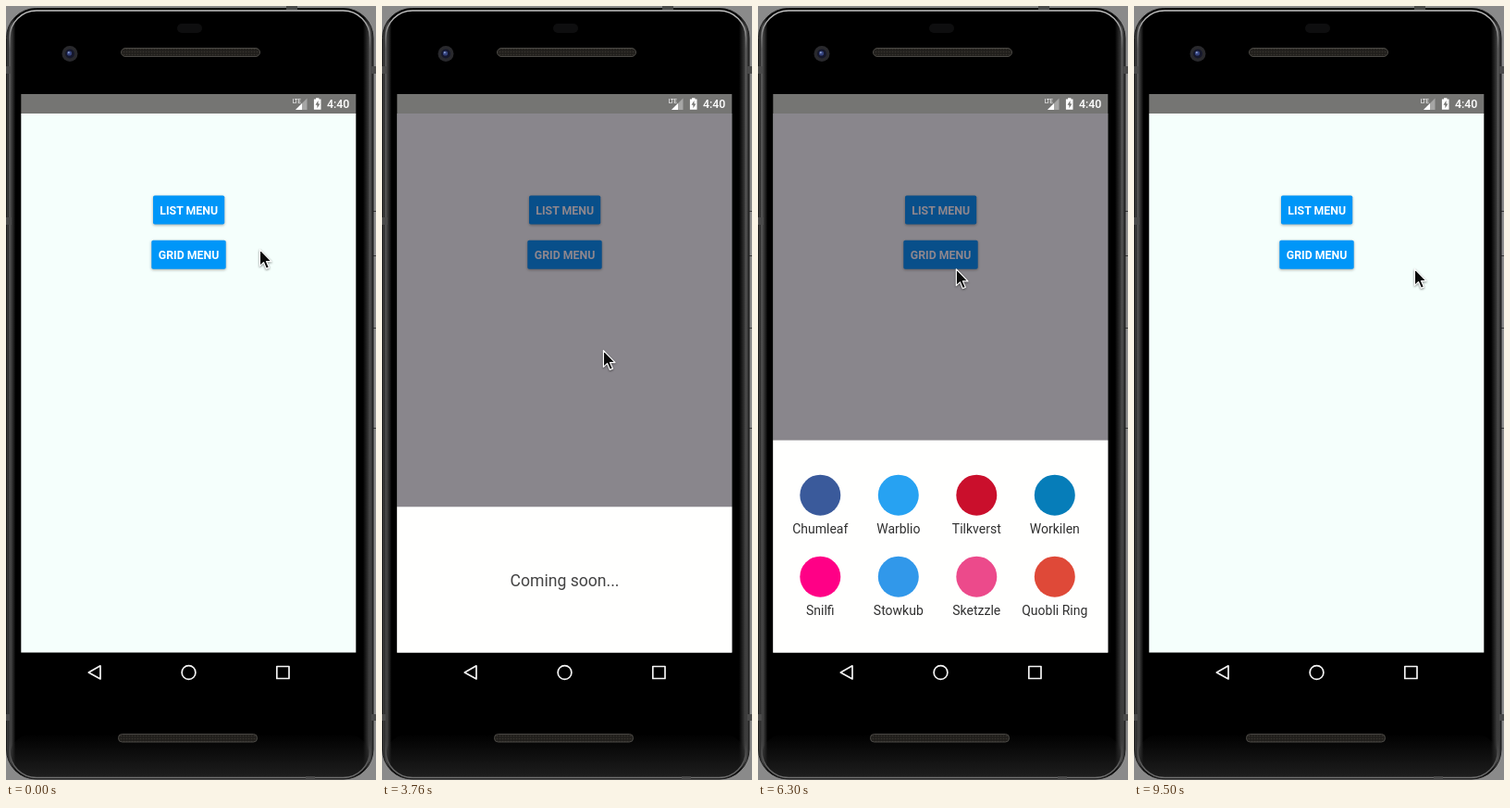
These frames come from a looping animation (400 by 835 pixels, 9.53 s). An HTML page:

```html
<!DOCTYPE html>
<html lang="en">
<head>
<meta charset="utf-8">
<title>Bottom sheet menu</title>
<style>
  html, body { margin: 0; width: 100%; height: 100%; overflow: hidden; background: #8a8a8a; }
  svg { display: block; width: 100%; height: 100%; }
  text { font-family: Roboto, sans-serif; }
  .btn rect { fill: #0096f8; filter: drop-shadow(0 1.6px 1.4px rgba(0, 0, 0, .34)); }
  .btn text { font-size: 12.33px; font-weight: 700; fill: #fff; text-anchor: middle; }
  .label { font-size: 14px; fill: #303030; text-anchor: middle; }
  #soon { font-size: 17.6px; fill: #444; text-anchor: middle; }
  #cursor { filter: drop-shadow(.5px 1.5px 1.2px rgba(0, 0, 0, .45)); }
</style>
</head>
<body>
<svg viewBox="0 0 400 835">
  <defs>
    <linearGradient id="side" gradientUnits="userSpaceOnUse" x1="0" x2="400">
      <stop offset="0" stop-color="#6a6a6a"/>
      <stop offset=".005" stop-color="#2a2a2a"/>
      <stop offset=".012" stop-color="#4a4a4a"/>
      <stop offset=".018" stop-color="#2c2c2c"/>
      <stop offset=".026" stop-color="#000"/>
      <stop offset=".965" stop-color="#000"/>
      <stop offset=".977" stop-color="#2c2c2c"/>
      <stop offset=".984" stop-color="#4a4a4a"/>
      <stop offset=".992" stop-color="#2a2a2a"/>
    </linearGradient>
    <linearGradient id="base" x2="0" y2="1">
      <stop offset="0" stop-color="#1e1e1e" stop-opacity="0"/>
      <stop offset="1" stop-color="#1e1e1e"/>
    </linearGradient>
    <linearGradient id="edge" x2="0" y2="1">
      <stop offset="0" stop-color="#c4c4c4"/>
      <stop offset=".05" stop-color="#5c5c5c"/>
      <stop offset=".95" stop-color="#3a3a3a"/>
      <stop offset="1" stop-color="#707070"/>
    </linearGradient>
    <pattern id="mesh" width="3" height="3" patternUnits="userSpaceOnUse">
      <rect width="3" height="3" fill="#211f1c"/>
      <circle cx="1.5" cy="1.5" r=".8" fill="#35322d"/>
    </pattern>
    <clipPath id="screen"><rect x="16.3" y="116" width="362" height="581.5"/></clipPath>
  </defs>

  <!-- handset -->
  <rect width="400" height="835" fill="#8a8a8a"/>
  <g fill="#8f8f8f" stroke="#3a3a3a">
    <rect x="395" y="221.5" width="6" height="48"/>
    <rect x="395" y="347.5" width="6" height="108"/>
  </g>
  <rect x=".5" y="2.5" width="396.5" height="831.5" rx="32" fill="url(#side)" stroke="#1b1b1b"/>
  <rect x="4" y="785" width="389" height="47" rx="26" fill="url(#base)"/>
  <rect x="4" y="5" width="389.5" height="827.5" rx="29" fill="none" stroke="url(#edge)" stroke-width="1.5"/>
  <g fill="#4a4a4a">
    <rect x="0" y="65" width="5" height="8"/>
    <rect x="0" y="228" width="6" height="8"/>
    <rect x="395" y="65" width="5" height="8"/>
    <rect x="303" y="0" width="12" height="4"/>
    <rect x="324" y="831" width="10" height="4"/>
    <rect x="0" y="764" width="4" height="7"/>
    <rect x="395" y="764" width="5" height="7"/>
  </g>
  <rect x="185" y="19" width="27" height="10" rx="5" fill="#0e0e0f"/>
  <g fill="url(#mesh)" stroke="#4a4844">
    <rect x="124.5" y="45.5" width="150" height="9" rx="4.5"/>
    <rect x="121.5" y="785.5" width="150" height="8.5" rx="4"/>
  </g>
  <circle cx="69" cy="51.5" r="8.5" fill="#29292d"/>
  <circle cx="69" cy="51.5" r="5" fill="#15172b"/>
  <circle cx="68.5" cy="51" r="2.6" fill="#35437e"/>
  <circle cx="67.8" cy="50.2" r="1" fill="#8da0d0"/>

  <!-- status bar -->
  <rect x="16.3" y="95" width="362" height="21.2" fill="#757573"/>
  <text x="309.8" y="105" font-size="6.6" letter-spacing="-.6" fill="#fff">LTE</text>
  <path d="M325.5 99.5V112H313Z" fill="#a6a6a5"/>
  <path d="M320 105V112H313Z" fill="#fff"/>
  <path d="M335 99.2h3.4v1.3h2.1v11.3h-7.6v-11.3h2.1Z" fill="#fff"/>
  <path d="M337.5 102l-3 4.7h1.9v3.5l3-4.8h-1.9Z" fill="#757573"/>
  <text x="359.2" y="110.3" font-size="12.4" font-weight="500" fill="#fff" text-anchor="middle">4:40</text>

  <!-- app -->
  <rect x="16.3" y="116" width="362" height="581.5" fill="#f5fffc"/>
  <g class="btn">
    <rect x="159" y="204.5" width="77.2" height="31" rx="1.8"/>
    <text x="197.7" y="224.8">LIST MENU</text>
    <rect x="157.3" y="252.7" width="80.4" height="31" rx="1.8"/>
    <text x="197.6" y="273.2">GRID MENU</text>
  </g>
  <g clip-path="url(#screen)">
    <rect id="mask" x="16" y="116" width="363" height="581.5" fill="#12000f" opacity=".475"/>
    <rect id="sheet" x="16" width="363" height="300" fill="#fffffe"/>
    <text id="soon" x="197.5">Coming soon...</text>
    <g id="grid"></g>
  </g>

  <!-- navigation -->
  <g fill="none" stroke="#f4f4f4" stroke-width="1.7" stroke-linejoin="round">
    <path d="M102 711.8V726L89.3 718.9Z"/>
    <circle cx="197.5" cy="719" r="7.4"/>
    <rect x="292.8" y="712.5" width="13.2" height="13"/>
  </g>

  <path id="cursor" d="M.4 .6V18.4L4.5 14.6L7.4 21.4L10.4 20.1L7.5 13.6H13Z" fill="#0b0b0b" stroke="#fff" stroke-width="1.2" stroke-linejoin="round"/>
</svg>
<script>
const LOOP = 9530, BOTTOM = 697.5, RUN = 300;
const el = id => document.getElementById(id);
const [mask, sheet, soon, grid, cursor] = ['mask', 'sheet', 'soon', 'grid', 'cursor'].map(el);

const items = [
  ['Chumleaf', '#3a5a9b'], ['Warblio', '#27a2f2'], ['Tilkverst', '#ca0f2c'], ['Workilen', '#067db9'],
  ['Snilfi', '#ff0086'], ['Stowkub', '#3198ea'], ['Sketzzle', '#ec4a8b'], ['Quobli Ring', '#df4938']
];
grid.innerHTML = items.map(([name, color], i) => {
  const x = 67.3 + (i % 4) * 84.5, y = 59.2 + (i >> 2) * 88;
  return `<circle cx="${x}" cy="${y}" r="22" fill="${color}"/>` +
    `<text class="label" x="${x}" y="${y + 41.7}">${name}</text>`;
}).join('');

// Each sheet: opening and closing start, last visible moment, full height
const sheets = [
  { open: 1039, close: 3629, end: 3960, height: 264, body: soon },
  { open: 5639, close: 8053, end: 8360, height: 229, body: grid }
];

// Pointer moves: start, end, target x, y, easing and optional curve control point
const clamp = v => Math.min(1, Math.max(0, v));
const linear = u => u;
const easeIn = u => u * u;
const smooth = u => u * u * (3 - 2 * u);
const easeOut = u => 1 - (1 - u) ** 2;
const moves = [
  [0, 760, 217, 216, smooth],
  [2300, 3160, 239, 371, smooth],
  [4400, 5060, 215, 271, smooth],
  [5200, 5360, 214, 268, smooth],
  [6130, 6300, 214, 283, easeIn],
  [6300, 6570, 198, 358, linear],
  [6570, 7530, 233, 525, easeOut, 160, 460],
  [8800, 9500, 303, 283, smooth]
];

// Cubic ease (.42, 0, 1, 1) solved by bisection, mirrored for in-out
function ease(x) {
  let a = 0, b = 1;
  for (let i = 0; i < 20; i++) {
    const s = (a + b) / 2, r = 1 - s;
    if (3 * r * r * s * .42 + 3 * r * s * s + s ** 3 < x) a = s; else b = s;
  }
  return 3 * (1 - a) * a * a + a ** 3;
}
const inOut = u => u < .5 ? ease(2 * u) / 2 : 1 - ease(2 - 2 * u) / 2;

function pointer(t) {
  let x = 274, y = 262;
  for (const [from, to, tx, ty, curve, cx = (x + tx) / 2, cy = (y + ty) / 2] of moves) {
    if (t < from) break;
    const u = curve(clamp((t - from) / (to - from))), v = 1 - u;
    x = v * v * x + 2 * u * v * cx + u * u * tx;
    y = v * v * y + 2 * u * v * cy + u * u * ty;
  }
  return [x, y];
}

const show = (node, on) => node.setAttribute('visibility', on ? 'visible' : 'hidden');

function draw(t) {
  const active = sheets.find(s => t >= s.open - 9 && t < s.end);
  [mask, sheet].forEach(node => show(node, active));
  sheets.forEach(s => show(s.body, s === active));
  if (active) {
    const { open, close, height } = active;
    const h = height * (inOut(clamp((t - open) / RUN)) - inOut(clamp((t - close) / RUN)));
    const top = BOTTOM - h;
    sheet.setAttribute('y', top);
    soon.setAttribute('y', BOTTOM - h / 2 + 7.2);
    grid.setAttribute('transform', `translate(0 ${top})`);
  }
  cursor.setAttribute('transform', `translate(${pointer(t)})`);
}

const start = performance.now();
function tick() {
  draw((performance.now() - start) % LOOP);
  requestAnimationFrame(tick);
}
tick();
</script>
</body>
</html>
```
